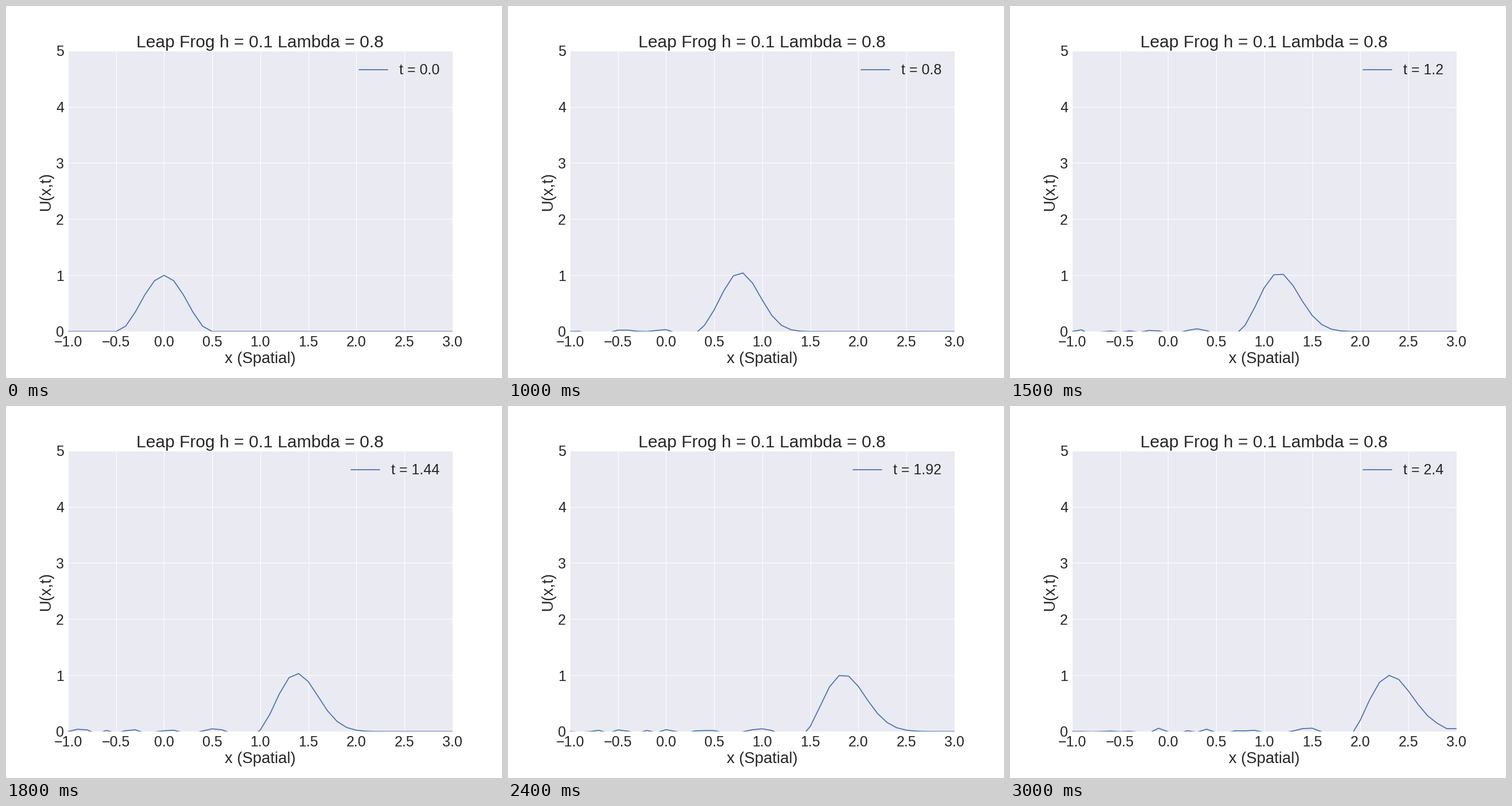
Recreate the animation shown at these times as a matplotlib script. Size 864 px wide and 648 px high, loop 3.1 s.

```python
import numpy as np
import matplotlib.pyplot as plt
from matplotlib.animation import FuncAnimation

H, LAM = 0.1, 0.8
DT = H * LAM
STEPS = 31

plt.rcParams.update({
    "font.family": "Liberation Sans",
    "text.color": "0.15",
    "axes.labelcolor": "0.15",
    "lines.solid_capstyle": "round",
})


def solve(x):
    """Leapfrog solution of u_t + u_x = 0, one row per time step."""
    u = np.zeros((STEPS, x.size))
    u[0] = np.where(np.abs(x) < 0.5 - 1e-9, np.cos(np.pi * x) ** 2, 0)
    for n in range(1, STEPS):
        # The first step is forward in time, central in space.
        base, k = (u[0], LAM / 2) if n == 1 else (u[n - 2], LAM)
        prev = u[n - 1]
        u[n, 1:-1] = base[1:-1] - k * (prev[2:] - prev[:-2])
        u[n, -1] = u[n, -2]
    return u


x = np.linspace(-1, 3, 41)
u = solve(x)

fig = plt.figure(figsize=(12, 9), dpi=72, facecolor="white")
ax = fig.add_axes([0.125, 0.125, 0.775, 0.755], facecolor="#EAEAF2")
ax.set(xlim=(-1, 3), ylim=(0, 5),
       xticks=np.arange(-1, 3.1, 0.5), yticks=range(6))
ax.set_axisbelow(True)
ax.grid(color="white", linewidth=1, linestyle="-")
ax.spines[:].set_visible(False)
ax.tick_params(length=0, pad=7, labelsize=25, labelcolor="0.15")
ax.set_title("Leap Frog h = 0.1 Lambda = 0.8", fontsize=30, pad=6)
ax.set_xlabel("x (Spatial)", fontsize=27.5, labelpad=4)
ax.set_ylabel("U(x,t)", fontsize=27.5, labelpad=4)

line, = ax.plot(x, u[0], color="#4C72B0", linewidth=1.75, label="t = 0.0")
legend = ax.legend(loc="upper right", fontsize=25, frameon=False)
label = legend.get_texts()[0]


def update(n):
    line.set_ydata(u[n])
    label.set_text(f"t = {round(n * DT, 2)}")
    return line, label


anim = FuncAnimation(fig, update, frames=STEPS, interval=100,
                     repeat=True, repeat_delay=0, blit=False)
plt.show()
```
